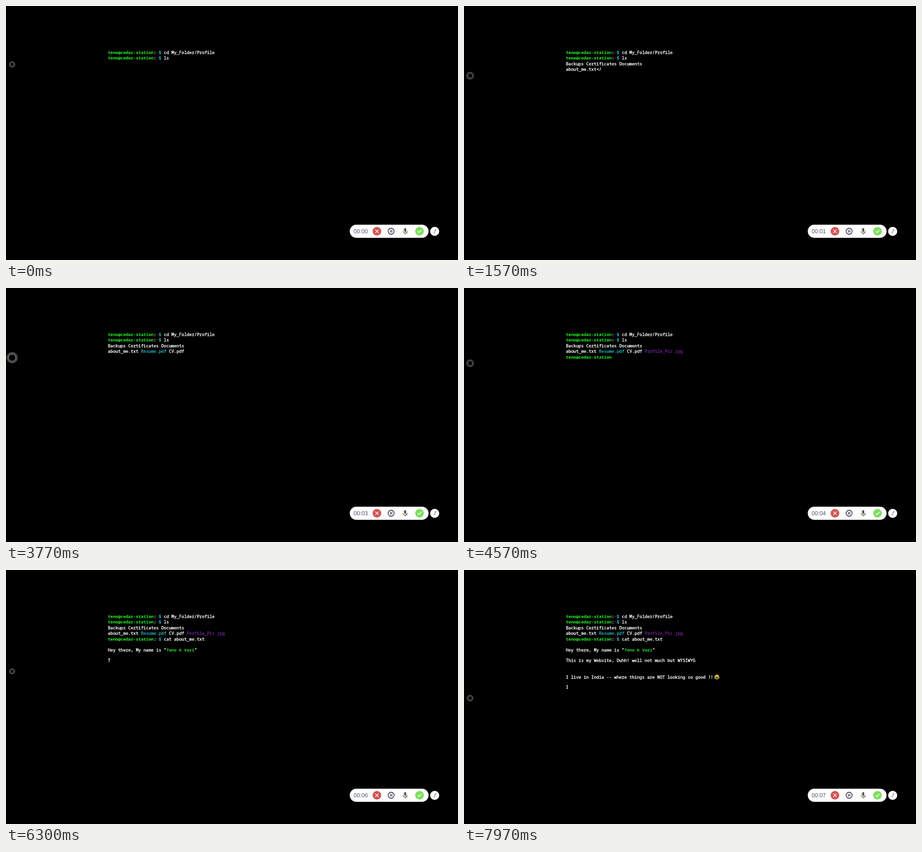
Recreate the animation shown at these times as an HTML page. Size 998x561 px, loop 8000 ms.

```html
<!DOCTYPE html>
<html lang="en">
<head>
<meta charset="utf-8">
<title>Terminal</title>
<style>
  html, body { margin: 0; width: 100%; height: 100%; overflow: hidden; background: #000; }
  svg { display: block; width: 998px; height: 561px; }
  #terminal { font: 9.36px "Noto Sans Mono", monospace; stroke-width: .4px; }
  #clock { font: 12.5px "Liberation Sans", Arial, sans-serif; fill: #50566b; }
  .line { fill: none; stroke-linecap: round; stroke-linejoin: round; }
</style>
</head>
<body>
<svg viewBox="0 0 998 561">
  <rect width="998" height="561"/>
  <g id="terminal"></g>

  <g id="emoji" transform="translate(558.3 236.3)">
    <circle r="5.2" fill="#f6c52b"/>
    <path d="M-3.3 .4H3.3Q3 4 0 4T-3.3 .4" fill="#5b3518"/>
    <path class="line" d="M-3.4-1.2l1.2-1 1.1 1M1.1-1.2l1.1-1 1.2 1" stroke="#5b3518"/>
    <path class="line" d="M-4.1 .6l-.6 2M4.1 .6l.6 2" stroke="#45a9cf" stroke-width="1.8"/>
  </g>

  <g id="ring">
    <circle id="halo"/>
    <circle id="hole" fill="#000"/>
  </g>

  <g id="recorder">
    <rect x="759" y="483" width="174" height="29" rx="14.5" fill="#fff"/>
    <text id="clock" x="767.6" y="501.5"></text>
    <circle cx="819" cy="497.5" r="9.6" fill="#d25555"/>
    <path class="line" d="M815.8 494.3l6.4 6.4m0-6.4l-6.4 6.4" stroke="#fff" stroke-width="1.3"/>
    <g class="line" stroke="#2b2e46" stroke-width="1.6">
      <circle cx="850.3" cy="497.5" r="6.6"/>
      <path d="M848.7 495.2v4.6M851.9 495.2v4.6"/>
    </g>
    <rect x="879.4" y="490.5" width="4.2" height="8.6" rx="2.1" fill="#555246"/>
    <path class="line" d="M877 497.2q0 4.4 4.5 4.4t4.5-4.4M881.5 501.6v2.6" stroke="#555246" stroke-width="1.2"/>
    <path class="line" d="M877 492.2l9.4 10.2" stroke="#555246" stroke-width=".7"/>
    <circle cx="913" cy="497.5" r="9.6" fill="#80de62"/>
    <path class="line" d="M909.2 497.8l2.7 2.7 5.2-5.5" stroke="#fff" stroke-width="1.3"/>
    <circle cx="946.5" cy="497.7" r="10" fill="#fff"/>
    <path class="line" d="M944.2 500.7h2.6q.8-2.6 0-3.5t1.2-2.7h1.6m-1.5-1.3 1.6 1.3-1.5 1.4" stroke="#666" stroke-width="1"/>
  </g>
</svg>
<script>
const LOOP = 8000, CHAR_MS = 12.5, ADVANCE = 5.616, LEFT = 225;
const BASELINES = [106, 118.4, 130.9, 143.3, 155.7, 180.3, 203, 239.5, 262.3];
const FIRST_PARAGRAPH = 5;
const WHITE = '#fff', GREEN = '#22ff22', RED = '#c51d3b', CYAN = '#20b8d8',
      TEAL = '#20aeb8', PURPLE = '#74239b', NAME_GREEN = '#28e328';
const $ = id => document.getElementById(id);
const segments = [];

function setAttributes(node, attrs) {
  for (const name in attrs) node.setAttribute(name, attrs[name]);
}

function type(start, row, col, text, fill = WHITE, bold = false, end = LOOP) {
  const node = document.createElementNS('http://www.w3.org/2000/svg', 'text');
  setAttributes(node, {
    x: LEFT + col * ADVANCE,
    y: BASELINES[row],
    fill,
    stroke: bold ? 'none' : fill,
    'font-weight': bold ? 700 : 400
  });
  $('terminal').append(node);
  segments.push({ start, end, row, text, node });
}

// Hidden markup between the prompt's parts delays each of them.
function prompt(row, command, times) {
  type(times[0], row, 0, 'teno@cedar-station', GREEN, true);
  type(times[1], row, 18, ':');
  type(times[2], row, 19, '~', RED, true);
  type(times[3], row, 20, '$', CYAN);
  type(times[4], row, 22, command);
}

const done = Array(5).fill(-1000);
prompt(0, 'cd My_Folder/Profile', done);
prompt(1, 'ls', done);
type(260, 2, 0, 'Backups');
type(650, 2, 8, 'Certificates');
type(1110, 2, 21, 'Documents');
type(1395, 3, 0, 'about_me.txt');
type(1545, 3, 12, '</', WHITE, false, 1600);
type(2665, 3, 13, 'Resume.pdf', TEAL);
type(3660, 3, 24, 'CV.pdf');
type(4000, 3, 31, 'Profile_Pic.jpg', PURPLE);
prompt(4, 'cat about_me.txt', [4345, 4660, 4835, 5110, 5218]);
type(5520, 5, 0, 'Hey there, My name is "');
type(5910, 5, 23, 'Teno K Vari', NAME_GREEN, true);
type(6120, 5, 34, '"');
type(6285, 6, 0, 'This is my Website, Duhh! well not much but WYSIWYG');
type(7130, 7, 0, 'I live in India -- where things are NOT looking so good !!');
type(7950, 8, 0, 'I');

function drawRing(t, row) {
  const swell = (0.5 + 0.5 * Math.cos(2 * Math.PI * (t / 1000 - 0.74))) ** 4;
  const y = BASELINES[row] + 10.6 + (row >= FIRST_PARAGRAPH ? 10.2 : 0);
  setAttributes($('ring'), { transform: `translate(13.6 ${y})` });
  setAttributes($('halo'), {
    r: 5.7 + 7 * swell,
    fill: `rgb(${[28, 28, 30].map(c => c + 42 * swell)})`,
    stroke: `rgba(165,165,155,${0.85 * (1 - swell)})`
  });
  setAttributes($('hole'), {
    r: 3.7 + 4.3 * swell,
    stroke: `rgba(185,185,175,${0.45 + 0.45 * swell})`
  });
}

function draw(t) {
  let lastRow = 0;
  for (const s of segments) {
    const count = t < s.end ? Math.max(0, Math.floor((t - s.start) / CHAR_MS)) : 0;
    s.node.textContent = s.text.slice(0, count);
    if (count) lastRow = Math.max(lastRow, s.row);
  }
  $('emoji').style.display = t >= 7860 ? '' : 'none';
  $('clock').textContent = '00:0' + Math.floor(t / 1000);
  drawRing(t, lastRow);
}

const began = performance.now();
function tick() {
  draw((performance.now() - began) % LOOP);
  requestAnimationFrame(tick);
}
tick();
</script>
</body>
</html>
```
